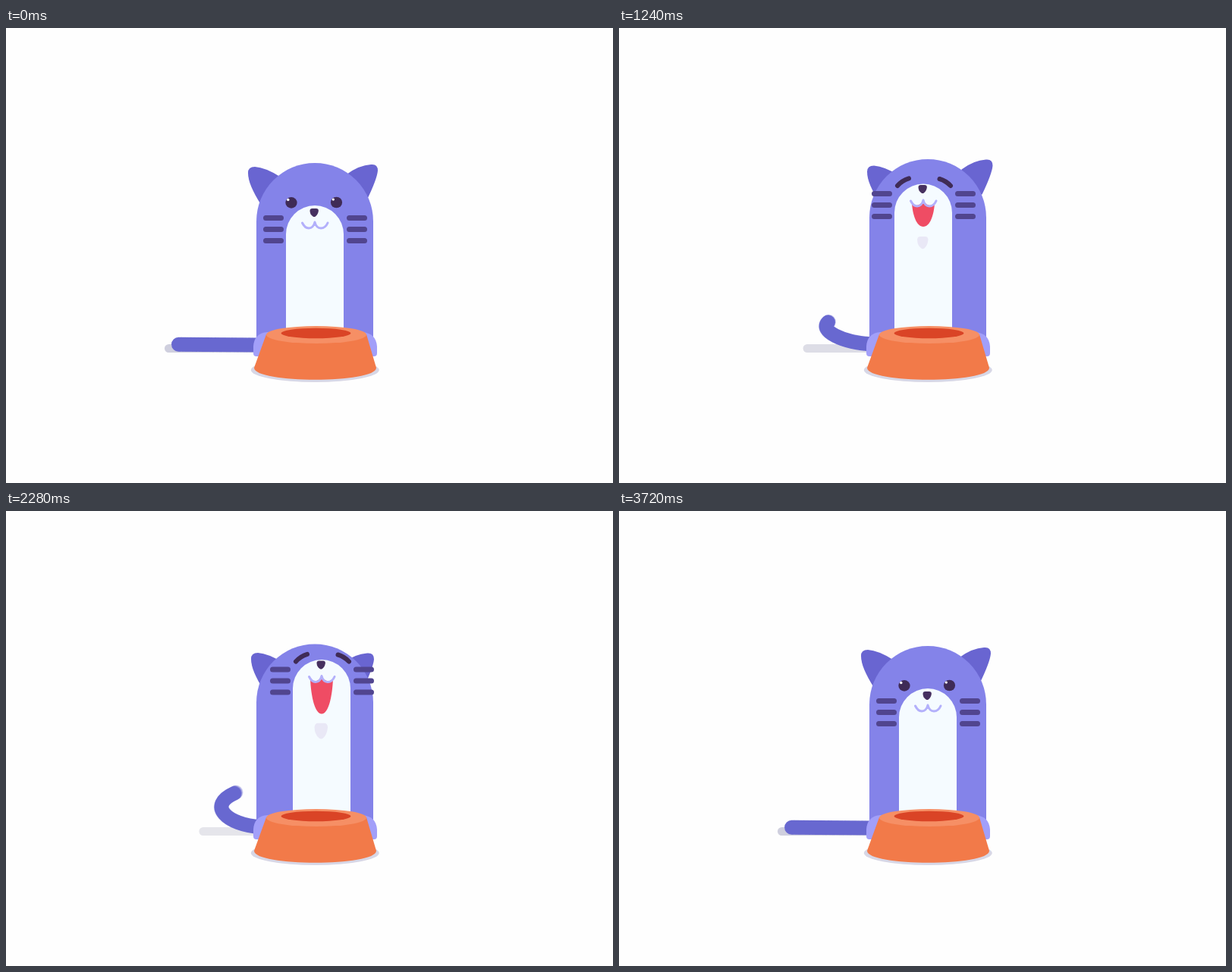
An HTML page with a canvas for the animation above (4000 ms loop, 800 px wide and 600 px high).

```html
<!DOCTYPE html>
<html lang="en">
<head>
<meta charset="utf-8">
<title>Hungry cat</title>
<style>
  html, body { margin: 0; width: 100%; height: 100%; overflow: hidden; background: #fefefe; }
  canvas { display: block; }
</style>
</head>
<body>
<canvas id="stage" width="800" height="600"></canvas>
<script>
const LOOP = 4000, STEP = 40;
const ctx = document.getElementById('stage').getContext('2d');
const tailLayer = Object.assign(document.createElement('canvas'), { width: 800, height: 600 });
const tailCtx = tailLayer.getContext('2d');

const BODY = '#8483e9', DARK = '#6965d1', PAW = '#a29ff9', EYE = '#3f2b56';

// Each key: [time, value, ...]
const POSE = [ // face x, face y, head lift, left ear x, y, right ear x, y
  [320, 0, 0, 0, 0, 0, 0, 0],
  [600, -1.3, -10.5, 0, 2, 1, 0, 0],
  [1240, -6, -32, -5, 8, -1.5, 2.5, -6.5],
  [1680, -6.6, -43.5, -6, 11, -0.5, 1, -2.5],
  [2280, 9, -41.5, -2.5, 4, 4, -5, 7.5],
  [2880, 0, 0, 0, 0, 0, 0, 0]
];
const TAIL = [[40, 0], [320, 1], [600, 0], [1120, .56], [1240, .6], [1440, .95], [1680, .48], [1880, 0],
  [2340, .97], [2620, 0], [2900, 1], [3160, 0], [3440, 1], [3720, 0]];
const GAPE = [[800, 0], [1240, 31], [1680, 48], [2280, 46], [2720, 0]];
const LIDS = [[680, 1], [800, .1], [2640, .1], [2760, 1], [3440, 1], [3560, .1], [3680, 1]];

// Cubic interpolation that is flat at turning points
function track(keys, t) {
  const last = keys.length - 1;
  if (t <= keys[0][0]) return keys[0].slice(1);
  if (t >= keys[last][0]) return keys[last].slice(1);
  const i = keys.findIndex(k => k[0] > t) - 1;
  const slope = (n, c) => (keys[n + 1][c] - keys[n][c]) / (keys[n + 1][0] - keys[n][0]);
  const tangent = (n, c) => {
    if (n === 0 || n === last) return 0;
    const a = slope(n - 1, c), b = slope(n, c);
    return a * b > 0 ? 2 * a * b / (a + b) : 0;
  };
  const [from, to] = [keys[i], keys[i + 1]];
  const span = to[0] - from[0], u = (t - from[0]) / span, e = u * u * (3 - 2 * u);
  return from.slice(1).map((v, j) => v + (to[j + 1] - v) * e
    + span * u * (1 - u) * (tangent(i, j + 1) * (1 - u) - tangent(i + 1, j + 1) * u));
}

function fill(path, color) {
  ctx.fillStyle = color;
  ctx.fill(new Path2D(path));
}

function line(path, color, width, target = ctx) {
  target.strokeStyle = color;
  target.lineWidth = width;
  target.lineCap = target.lineJoin = 'round';
  target.stroke(new Path2D(path));
}

function oval(x, y, rx, ry, color) {
  ctx.fillStyle = color;
  ctx.beginPath();
  ctx.ellipse(x, y, rx, ry, 0, 0, 7);
  ctx.fill();
}

function at(x, y, draw) {
  ctx.save();
  ctx.translate(x, y);
  draw();
  ctx.restore();
}

function drawTail(t) {
  const [curl] = track(TAIL, t);
  const grey = Math.round(207 + 24 * curl);
  line(`M${214.5 + 48 * curl ** .7} 422.5H335`, `rgb(${grey},${grey},${Math.round(222 + 14 * curl)})`, 11);

  // Average several moments for motion blur
  const samples = 8, shutter = 24;
  tailCtx.clearRect(0, 0, 800, 600);
  tailCtx.globalCompositeOperation = 'lighter';
  tailCtx.globalAlpha = 1 / samples;
  for (let i = 0; i < samples; i++) {
    const [v] = track(TAIL, t + shutter * (i / (samples - 1) - .5));
    const mix = (a, b) => a + (b - a) * v;
    line(`M335 ${mix(418, 416.5)}C${mix(297, 291)} ${mix(417.7, 413.5)} ${mix(262, 264)} ${mix(417.5, 386)} `
      + `${mix(227.5, 308)} ${mix(417.3, 368)}`, DARK, 19, tailCtx);
  }
  ctx.drawImage(tailLayer, 0, 0);
}

const NOSE = 'M-2.5-5.5h5q3.2 0 3.2 3q-.6 5-4 7.5q-1.7 1-3.4 0q-4-2.8-4-7.5q0-3 3.2-3z';

function drawEyes(lid, smiling) {
  if (smiling && lid < .15) {
    line('M373 240Q379 233 388 230.3M428.5 231Q437 233.5 443 240', EYE, 6);
    return;
  }
  for (const [x, y] of [[376, 230.4], [435.5, 230]]) {
    at(x, y, () => {
      ctx.scale(1, lid);
      oval(0, 0, 7.6, 7.3, EYE);
      oval(-4.2, -3.9, 1.7, 1.7, '#fff');
    });
  }
}

function drawFace(x, y, t) {
  const [gape] = track(GAPE, t), [lid] = track(LIDS, t);
  const open = Math.min(1, gape / 31);

  at(x, y + 3.5 * open, () =>
    fill(`M369 ${420 - y}V272a38 38 0 0 1 76 0V${420 - y}z`, '#f5fbff'));
  at(x, y, () => {
    for (const row of [250.5, 265.5, 280.5])
      line(`M342.5 ${row}h20M452.5 ${row}h20`, '#51458f', 7);
    drawEyes(lid, gape > 0);
  });
  at(406.2 + x, 243.5 + y + open, () => fill(NOSE, '#46305f'));
  at(x, y + 3 * open, () => {
    if (gape > 1) {
      const low = 260 + gape, side = 260 + gape * .5;
      fill(`M392 260Q399 267 407 257Q415 267 422 260C421 ${side} 416 ${low} 407 ${low}`
        + `C398 ${low} 393 ${side} 392 260z`, '#ef4c64');
    }
    line('M390.5 257Q394 264 399 264Q405 264 407 256Q409 264 415 264Q421 264 424 257', '#b3b0fb', 3);
  });
  if (gape > 0) at(406.3 + x, 268.5 + .47 * gape, () => {
    ctx.globalAlpha = open;
    ctx.scale(.7 + .018 * gape, .6 + .028 * gape);
    fill(NOSE, '#e9e8f6');
  });
}

function drawBowl() {
  oval(407.3, 451, 84.5, 16, '#d7d7e6');
  fill('M326 433V420Q327 402 345 401H470Q488 403 489 420V429Q489 433 485 433H330Q326 433 326 429z', PAW);
  fill('M343 404L327 448C327 469 488 469 488 448L475 404z', '#f27a49');
  oval(409, 404.5, 66, 11.5, '#f68f65');
  oval(408.5, 402.5, 46, 6.7, '#da4426');
}

function draw(t) {
  const [x, y, lift, leftX, leftY, rightX, rightY] = track(POSE, t);
  ctx.fillStyle = '#fefefe';
  ctx.fillRect(0, 0, 800, 600);
  drawTail(t);
  at(leftX, leftY, () => fill('M336 233C325 215 319 202 319 191Q319 183 328 183Q342 184 361 196L380 230z', DARK));
  at(rightX, rightY, () => fill('M449 193Q465 181 481 180Q490 179 490 188Q489 199 476 226L440 230z', DARK));
  fill(`M330 420V${255 + lift}a77 77 0 0 1 154 0V420z`, BODY);
  drawFace(x, y, t);
  drawBowl();
}

function tick(now) {
  draw(Math.floor(now % LOOP / STEP) * STEP);
  requestAnimationFrame(tick);
}
requestAnimationFrame(tick);
</script>
</body>
</html>
```
